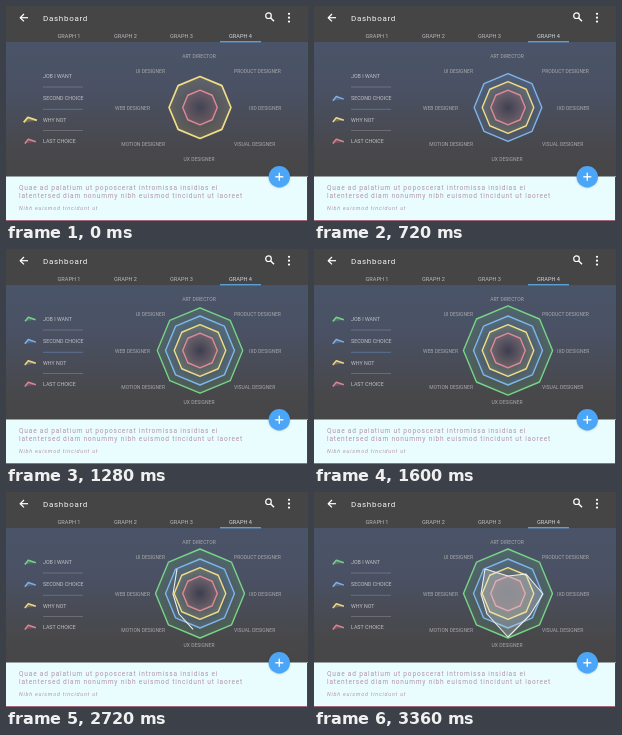
Write an HTML page with a canvas that moves like this. It is 302 px wide and 215 px high and loops after 3.44 s.

```html
<!DOCTYPE html>
<html lang="en">
<head>
<meta charset="utf-8">
<title>Dashboard</title>
<style>
html, body { margin: 0; width: 100%; height: 100%; overflow: hidden; background: #454548; }
canvas { display: block; width: 302px; height: 215px; }
</style>
</head>
<body>
<canvas id="stage"></canvas>
<script>
const W = 302, H = 215, LOOP = 3440, STEP = 80;
const CX = 194, CY = 101.5;
const canvas = document.getElementById('stage');
const ctx = canvas.getContext('2d');
const dpr = window.devicePixelRatio || 1;
canvas.width = W * dpr;
canvas.height = H * dpr;

// Rings from outside in; start is when each one springs open, in ms.
const rings = [
  { name: 'JOB I WANT', color: '#78d488', rgb: '110,200,130', r: 44.5, y: 70, start: 900 },
  { name: 'SECOND CHOICE', color: '#7fb5ea', rgb: '110,160,225', r: 34.5, y: 92.3, start: 388 },
  { name: 'WHY NOT', color: '#f0dd86', rgb: '210,190,120', r: 25.8, y: 113.5, start: -200 },
  { name: 'LAST CHOICE', color: '#de8998', rgb: '205,105,125', r: 17.3, y: 135, start: -2000 }
];
const roles = [
  ['ART DIRECTOR', 193, 52, 'center'], ['PRODUCT DESIGNER', 228, 67, 'left'],
  ['IXD DESIGNER', 243, 104, 'left'], ['VISUAL DESIGNER', 228, 140, 'left'],
  ['UX DESIGNER', 193, 155, 'center'], ['MOTION DESIGNER', 159, 140, 'right'],
  ['WEB DESIGNER', 144, 104, 'right'], ['UI DESIGNER', 159, 67, 'right']
];
const profile = [[171, 77], [167, 102], [173, 122], [194, 145], [216, 123], [229, 102], [212, 82], [194, 84], [171, 77]];

const clamp = v => Math.max(0, Math.min(1, v));

function spring(ms) {
  const s = ms / 1000;
  return s <= 0 ? 0 : 1 - Math.exp(-8 * s) * Math.cos(15 * s);
}

function text(str, x, y, size, color, { align = 'left', style = '', gap = 0 } = {}) {
  ctx.font = `${style} ${size}px Roboto, sans-serif`;
  ctx.letterSpacing = gap + 'px';
  ctx.textAlign = align;
  ctx.fillStyle = color;
  ctx.fillText(str, x, y);
}

function line(points, color, width) {
  ctx.beginPath();
  points.forEach(([x, y]) => ctx.lineTo(x, y));
  ctx.strokeStyle = color;
  ctx.lineWidth = width;
  ctx.stroke();
}

function disc(x, y, r, color) {
  ctx.beginPath();
  ctx.arc(x, y, r, 0, Math.PI * 2);
  ctx.fillStyle = color;
  ctx.fill();
}

function radial(r, inner, outer) {
  const g = ctx.createRadialGradient(CX, CY, 0, CX, CY, r);
  g.addColorStop(0, inner);
  g.addColorStop(1, outer);
  return g;
}

function background() {
  ctx.fillStyle = '#454546';
  ctx.fillRect(0, 0, W, H);
  const g = ctx.createLinearGradient(0, 36, 0, 171);
  g.addColorStop(0, '#4a5468');
  g.addColorStop(0.35, '#4a5164');
  g.addColorStop(0.8, '#48484b');
  g.addColorStop(1, '#464647');
  ctx.fillStyle = g;
  ctx.fillRect(0, 36, W, 135);
}

function header() {
  line([[22, 11.7], [14.5, 11.7]], '#fff', 1.2);
  line([[18, 8], [14.2, 11.7], [18, 15.4]], '#fff', 1.2);
  text('Dashboard', 37, 14.6, 8, '#f4f4f4', { gap: 0.7 });
  ctx.beginPath();
  ctx.arc(262.5, 9.7, 2.8, 0, Math.PI * 2);
  ctx.lineWidth = 1.2;
  ctx.strokeStyle = '#fff';
  ctx.stroke();
  line([[264.5, 11.7], [268, 15.2]], '#fff', 1.4);
  [7.8, 11.7, 15.6].forEach(y => disc(283, y, 1.1, '#fff'));
  [63, 119.5, 175.5, 234.5].forEach((x, i) =>
    text('GRAPH ' + (i + 1), x, 31.5, 5.6, i === 3 ? '#d4d8dc' : '#bbbbbd', { align: 'center' }));
  ctx.fillStyle = '#5a9fd4';
  ctx.fillRect(214, 35, 41, 1.4);
}

function legend(t) {
  rings.forEach((ring, i) => {
    text(ring.name, 37, ring.y + 2, 5.3, '#c3c2c4');
    if (i < 3) line([[37, ring.y + 11], [77, ring.y + 11]], i === 1 ? 'rgba(110,150,200,.6)' : 'rgba(175,165,170,.45)', 0.8);
    const s = spring(t - ring.start);
    if (s <= 0) return;
    ctx.save();
    ctx.translate(24.3, ring.y);
    ctx.scale(s, s);
    line([[-5.5, 2.4], [-2, -1.8], [5.5, 0.8]], ring.color, 1.5);
    ctx.fillStyle = `rgba(${ring.rgb},.3)`;
    ctx.fill();
    ctx.restore();
  });
}

function octagon(r) {
  ctx.beginPath();
  for (let i = 0; i < 8; i++) {
    const a = i * Math.PI / 4;
    ctx.lineTo(CX + r * Math.sin(a), CY - r * Math.cos(a));
  }
  ctx.closePath();
}

function chart(t) {
  rings.forEach(ring => {
    const s = spring(t - ring.start);
    if (s <= 0) return;
    const r = ring.r * s;
    octagon(r);
    ctx.fillStyle = radial(r, 'rgba(50,50,70,.2)', `rgba(${ring.rgb},.18)`);
    ctx.fill();
    ctx.strokeStyle = ring.color;
    ctx.lineWidth = 1.4 * s;
    ctx.stroke();
  });
  roles.forEach(([name, x, y, align]) => text(name, x, y, 5, '#a9a8ab', { align }));
}

// The part of a polyline covered after the given share of its length.
function trim(points, share) {
  const dist = (a, b) => Math.hypot(b[0] - a[0], b[1] - a[1]);
  let left = share * points.slice(1).reduce((sum, p, i) => sum + dist(points[i], p), 0);
  const out = [points[0]];
  for (let i = 1; i < points.length && left > 0; i++) {
    const a = points[i - 1], b = points[i], d = dist(a, b);
    const k = Math.min(1, left / d);
    out.push([a[0] + (b[0] - a[0]) * k, a[1] + (b[1] - a[1]) * k]);
    left -= d;
  }
  return out;
}

function drawProfile(t) {
  const share = Math.pow(clamp((t - 1960) / 1400), 1.8);
  if (share <= 0) return;
  line(trim(profile, share), '#f0efec', 1.1);
  const fade = clamp((t - 2880) / 480);
  ctx.fillStyle = radial(36, `rgba(235,240,235,${0.45 * fade})`, `rgba(230,230,230,${0.2 * fade})`);
  ctx.fill();
}

function panel() {
  ctx.fillStyle = '#e9fdff';
  ctx.fillRect(0, 170.5, W, 44.5);
  ctx.fillStyle = '#a06878';
  ctx.fillRect(0, 214, W, 1);
  ctx.fillStyle = '#474747';
  ctx.fillRect(301, 171, 1, 44);
  text('Quae ad palatium ut poposcerat intromissa insidias ei', 13, 184, 6.6, '#b595a9', { gap: 0.79 });
  text('latentersed diam nonummy nibh euismod tincidunt ut laoreet', 13, 191.7, 6.6, '#b595a9', { gap: 0.79 });
  text('Nibh euismod tincidunt ut', 13, 204, 5.4, '#b596a8', { style: 'italic', gap: 0.78 });
  ctx.save();
  ctx.shadowColor = 'rgba(0,0,0,.2)';
  ctx.shadowBlur = 2 * dpr;
  ctx.shadowOffsetY = 0.5 * dpr;
  disc(273.3, 170.8, 10.7, '#4ca6f8');
  ctx.restore();
  line([[269.3, 170.8], [277.3, 170.8]], '#fff', 1.4);
  line([[273.3, 166.8], [273.3, 174.8]], '#fff', 1.4);
}

// Time moves in steps; every fifth step holds, with one longer rest.
function stepTime(ms) {
  let n = Math.floor((ms % LOOP) / STEP);
  if (n > 20 && n < 25) n = 20;
  else if (n % 5 === 3) n--;
  return n * STEP;
}

function draw(t) {
  ctx.setTransform(dpr, 0, 0, dpr, 0, 0);
  ctx.lineJoin = 'round';
  background();
  header();
  legend(t);
  chart(t);
  drawProfile(t);
  panel();
}

const begin = performance.now();
function tick() {
  draw(stepTime(performance.now() - begin));
  requestAnimationFrame(tick);
}
tick();
</script>
</body>
</html>
```
